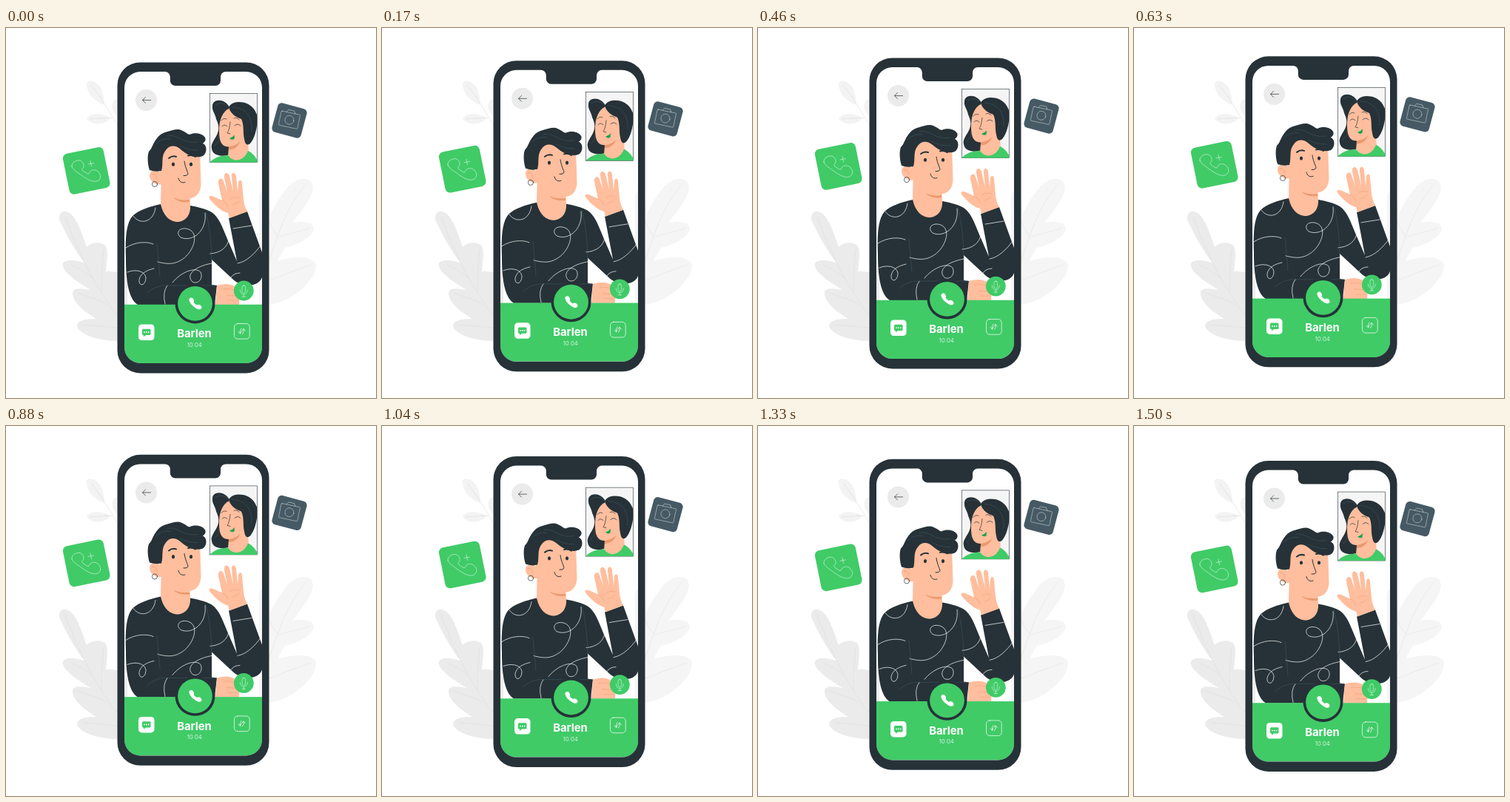
Animation of 500 by 500 pixels, one loop 1.54 s. Source, as an HTML page:

```html
<!DOCTYPE html>
<html lang="en">
<head>
<meta charset="utf-8">
<title>Video call</title>
<style>
  html, body { margin: 0; width: 100%; height: 100%; overflow: hidden; background: #fff; }
  svg { display: block; width: 100%; height: 100%; }
  .dark { fill: #263238; }
  .green { fill: #40cb67; }
  .skin { fill: #ffbe9d; }
  .shade { fill: #eb996e; }
  .white { fill: #fff; }
  .line { fill: none; stroke: #fff; stroke-width: .7; stroke-linecap: round; stroke-linejoin: round; }
  .thin { stroke-width: .5; }
  .bold { stroke-width: 2; }
  .ink { stroke: #263238; }
  .soft { stroke: #eb996e; }
  .fold { stroke: #455a64; stroke-width: .5; }
  text { fill: #fff; text-anchor: middle; font-family: Inter, sans-serif; }
</style>
</head>
<body>
<svg viewBox="0 0 500 500">
  <defs>
    <path id="screen" d="M181.5 59H214.5A7 7 0 0 1 221.8 66V71A7 7 0 0 0 228.8 78H283A7 7 0 0 0 290 71V66A7 7 0 0 1 297 59H324.5A21.5 21.5 0 0 1 346 80.5V431.5A21.5 21.5 0 0 1 324.5 453H181.5A21.5 21.5 0 0 1 160 431.5V80.5A21.5 21.5 0 0 1 181.5 59Z"/>
    <clipPath id="inside"><use href="#screen"/></clipPath>
    <clipPath id="inset"><rect x="275.5" y="88.5" width="64" height="93"/></clipPath>
  </defs>

  <!-- Plants -->
  <g fill="#ebebeb">
    <path d="M73 261C69 252 76 245 84 249C96 255 102 277 109 296C113 291 124 288 132 292C139 296 137 309 135 329C146 328 159 331 164 342V423C140 424 111 421 98 407C92 399 101 392 122 393C111 386 92 374 90 360C89 351 98 351 114 354C99 344 80 333 77 322C74 313 89 312 106 317C95 303 82 281 73 261Z"/>
    <path class="line" style="stroke:#e0e0e0" d="M80 256C96 298 125 365 164 402M88 320C104 328 113 333 119 340M132 300C130 320 129 341 129 356M97 358C113 365 126 366 136 374M105 401C124 402 144 405 160 406"/>
  </g>
  <g fill="#f5f5f5">
    <path d="M342 240C340 226 344 218 350 220C357 225 356 242 357 253C363 238 372 226 380 216C391 203 407 200 413 209C418 218 411 231 402 243L387 263C401 260 416 262 416 271C415 282 395 293 377 297C373 302 370 309 367 315C383 310 409 306 418 317C423 329 406 351 386 363C374 371 359 374 342 376Z"/>
    <path class="line" style="stroke:#e6e6e6" d="M405 212C383 235 365 279 347 344M411 270C396 276 384 277 369 282M348 234C352 257 358 270 368 282M412 320C390 328 370 335 349 344"/>
  </g>
  <g fill="#f3f3f3">
    <path d="M109 76C108 69 119 70 125 77C132 85 132 94 133 104C121 100 109 89 109 76Z"/>
    <path d="M109 122C115 114 132 115 141 122C133 132 114 132 109 122Z"/>
    <path d="M151 96C141 97 141 112 151 119Z"/>
    <path class="line" style="stroke:#e0e0e0" d="M115 77C128 93 139 112 151 132M113 123Q130 122 143 121"/>
  </g>

  <g id="float">
    <!-- Call tile -->
    <rect class="green" x="80.7" y="164.9" width="56" height="56" rx="6.5" transform="rotate(-11.5 108.7 192.9)"/>
    <path class="line thin" d="M89 187C88 182 95 178 100 179C105 181 107 187 103 190Q102 191 104 193L110 197Q112 198 113 195C115 191 122 190 126 196C129 200 128 205 123 207C117 209 109 204 102 199C95 194 90 191 89 187ZM111 184L118.5 182.5M114 179.5L115.5 187"/>

    <!-- Camera tile -->
    <rect x="362.7" y="104.7" width="40.6" height="40.6" rx="5.5" fill="#455a64" transform="rotate(15 383 125)"/>
    <g class="line" style="stroke-width:.4" transform="rotate(12 383 124)">
      <rect x="370" y="114.5" width="26" height="19.5" rx="1"/>
      <path d="M377 114.5L379 111H387L389 114.5"/>
      <circle cx="383" cy="124.3" r="6"/>
    </g>

    <g clip-path="url(#inside)">
      <circle cx="189.5" cy="97.5" r="14.5" fill="#ebebeb"/>
      <path class="line ink" d="M195.5 97.5H184.5M188.5 93.5L184.5 97.5L188.5 101.5"/>

      <!-- Inset caller -->
      <rect x="275.5" y="88.5" width="64" height="93" fill="#f5f5f5" stroke="#263238" stroke-width=".6"/>
      <g clip-path="url(#inset)">
        <path class="dark" d="M302 107C295 94 279 96 279 105C278 112 283 116 284 123C288 131 288 137 286 142C283 150 276 156 278 163C279 172 291 175 302 171L307 158L300 112Z"/>
        <path class="skin" d="M299 110C290 117 288 128 288 140C288 152 291 161 301 160.5L300 173C305 183 321 181 328 172L327 152C330 130 316 112 305 108Z"/>
        <path class="shade" d="M301 160.5Q311 159 317 153Q311 165 301 164.5Z"/>
        <path class="dark" d="M301 107C303 116 312 121 318 123C322 131 320 142 322 150C323 156 325 160 330 156C337 148 341 130 339 117C334 104 325 100 314 100C308 100 303 103 301 107Z"/>
        <path class="green" d="M275 182C280 176 289 172 300 172C307 182 321 181 327 166C334 169 338 175 341 182Z"/>
        <path class="line ink" d="M292 133Q295 129 299 133M309 132Q313 128 317 132M303 127Q302 138 299 142L303 143M291 125Q294 121 298 123M308 122Q312 120 315 124"/>
        <path d="M302 149Q306 148 309 144.5L308.5 150Q305 152 302 149Z" fill="#17a34a"/>
        <path class="line fold" d="M283 104Q291 98 301 106M306 107C323 108 333 118 332 139M282 159Q289 153 288 147"/>
      </g>

      <!-- Sweater -->
      <path class="dark" d="M209 238C195 241 179 246 171 254C162 264 161 286 162 312C162 335 164 365 178 374H282L285 348L278 347V313L306 339C313 346 324 349 334 347C343 345 348 338 347 327V306L326 248L301 257L312 315L299 285C292 268 288 256 278 249C269 244 260 242 249 240Z"/>
      <path class="line" d="M172 254C180 266 199 264 202 243M162 297C174 289 190 288 199 292M269 250C272 274 252 290 236 283C227 275 238 267 249 273C262 281 251 306 236 314C225 321 213 318 205 316M164 330C173 326 187 327 189 337C189 349 179 350 180 340C182 331 191 327 200 325M225 344C236 330 256 322 263 330C267 339 259 347 252 343C242 333 256 322 278 318M276 305C290 304 300 296 301 285M307 271Q319 269 332 267M313 318C325 316 336 305 344 294M304 337Q308 331 316 331M218 348Q211 357 215 373"/>
      <path class="line fold" d="M204 291L208 336M270 248Q278 280 278 316M191 358Q199 350 212 348L284 348"/>

      <!-- Head -->
      <path class="skin" d="M210 190L209 238C213 255 222 262 233 262C243 261 250 252 249 240L248 220Z"/>
      <path class="shade" d="M226 229Q236 234 248 232V235Q234 237 226 229Z"/>
      <path class="skin" d="M211 165C221 150 250 156 262 171C263 187 263 201 263.5 211C263 223 257 230 245 231C232 232 219 224 211 211C204 213 195 209 194 200C194 192 202 190 208 195Z"/>
      <path class="line soft" d="M197 198Q203 196 204 204"/>
      <path class="dark" d="M194 192C191 183 191 172 193 167C196 164 197 161 199 157C203 149 208 143 215 141C222 139 227 137 233 137C240 138 244 143 248 144C256 140 267 143 269.5 149C270 153 268 154 266 156C272 158 272 169 266 173C256 177 244 171 236 164C229 158 221 158 216 165C209 173 213 184 210 193Q202 195 194 192Z"/>
      <path class="line fold" d="M202 157Q210 148 223 150M218 146C232 142 239 158 260 154M235 159Q247 166 260 165"/>
      <ellipse class="dark" cx="226" cy="184.2" rx="2.1" ry="2.6"/>
      <ellipse class="dark" cx="250" cy="184.2" rx="2.1" ry="2.6"/>
      <path class="line ink bold" d="M220 176Q225 172 230 174M246 172.5Q251 171 256 174"/>
      <path class="line ink" style="stroke-width:1" d="M241 180C242 188 245 193 246 197Q245 200 240 199.5M233 203C234 208 238 210 242 208.5"/>
      <circle class="line ink" cx="201" cy="211" r="3.6"/>

      <!-- Hands -->
      <path class="skin" d="M302 257L300 250C291 248 283 240 276 232C272 227 277 226 281 228L292 233L287 210C286 203 292 201 294 207L299 222L295 202C294 195 300 194 302 200L307 221L305 201C304 195 310 194 311 200L313 222L314 209C315 204 319 205 319 210L321 232Q322 241 326 248Z"/>
      <path class="line soft thin" d="M292 233Q299 236 300 242M303 231Q310 227 316 230M306 239Q312 237 315 234"/>
      <path class="skin" d="M285 348Q299 344 307 348L316 353L315 374H283Z"/>
      <path class="line soft thin" d="M293 353Q302 351 311 355M298 361L313 362M301 368L313 368"/>

      <!-- Controls -->
      <rect class="green" x="159" y="373.7" width="188" height="80"/>
      <circle class="green" cx="321.3" cy="355" r="13.4"/>
      <g class="line thin">
        <rect x="319" y="348" width="4.6" height="10" rx="2.3"/>
        <path d="M316.3 354C316 362 326.5 362 326.3 354M321.3 360V363M319 363H323.6"/>
      </g>
      <circle class="dark" cx="255.5" cy="372.4" r="27"/>
      <circle class="green" cx="255.5" cy="372.4" r="23.4"/>
      <path class="white" d="M247.5 368C246.5 365 251 363 253 366Q255 369 253.5 370.5Q255 373 258 374.5C260 372.5 264 374.5 264.5 377.5C264.5 381 260 381 256.5 378.5C252 375.5 248.5 372 247.5 368Z"/>

      <rect class="white" x="179" y="400.5" width="21.5" height="21.5" rx="4.5"/>
      <path class="green" d="M185.5 406.7H194Q195.5 406.7 195.5 408.2V413.5Q195.5 415 194 415H189L186 417.3V415H185.5Q184 415 184 413.5V408.2Q184 406.7 185.5 406.7Z"/>
      <g class="white">
        <circle cx="187" cy="411" r=".9"/><circle cx="189.8" cy="411" r=".9"/><circle cx="192.6" cy="411" r=".9"/>
      </g>

      <rect class="line" x="308.5" y="399.5" width="20.7" height="20.7" rx="4.5"/>
      <path class="line" d="M318 406Q315 409 316.5 413M314 410.5L316.5 413L318 409.8M319.5 413.5Q322.5 410.5 321 406.5M318.8 409L321 406.5L323.5 409"/>

      <text x="254.5" y="418.2" font-size="14.8" font-weight="700">Barlen</text>
      <text x="254.7" y="431" font-size="7.9" font-weight="300">10:04</text>
    </g>

    <!-- Phone body -->
    <rect class="dark" x="150.5" y="46.4" width="205" height="420" rx="31" mask="url(#bezel)"/>
    <mask id="bezel" maskUnits="userSpaceOnUse" x="140" y="40" width="225" height="435">
      <rect class="white" x="140" y="40" width="225" height="435"/>
      <use href="#screen"/>
    </mask>
  </g>
</svg>
<script>
  const STEPS = 37, FPS = 24, LOOP = 1540, RISE = 10;
  const group = document.getElementById("float");

  // Linear rise and fall, stepped at 24 pictures per second.
  function lift(step) {
    const p = (step + 1) / STEPS;
    return RISE * (1 - Math.abs(1 - 2 * p));
  }

  const rest = lift(0);
  const start = performance.now();

  function draw(now) {
    const t = Math.max(0, now - start) % LOOP;
    const step = Math.min(STEPS - 1, Math.floor((t + 5) * FPS / 1000));
    group.setAttribute("transform", `translate(0 ${(rest - lift(step)).toFixed(3)})`);
    requestAnimationFrame(draw);
  }
  draw(start);
</script>
</body>
</html>
```
